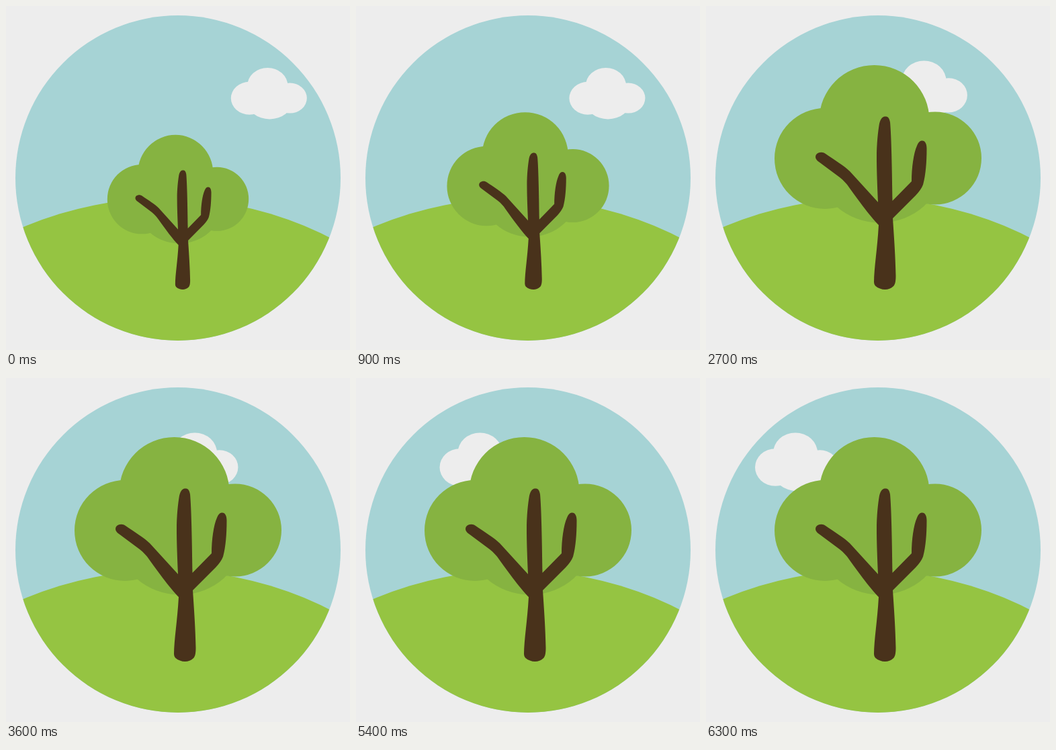
An HTML page with a canvas for the animation above (7200 ms loop, 512 px wide and 512 px high).

```html
<!DOCTYPE html>
<html lang="en">
<head>
<meta charset="utf-8">
<title>Growing tree</title>
<style>
html, body { margin: 0; width: 100%; height: 100%; overflow: hidden; background: #ededed; }
canvas { display: block; width: 100vw; height: 100vh; }
</style>
</head>
<body>
<canvas id="stage" width="512" height="512"></canvas>
<script>
const ctx = document.getElementById('stage').getContext('2d');
const STEP = 900;
const PALE = '#ededed', SKY = '#a6d3d5', GRASS = '#95c442', LEAF = '#86b341', BARK = '#49321b';

// The tree grows for three steps, then holds its full size.
const treeScales = [[0.683, 0.689], [0.783, 0.79], [0.9, 0.909], [1, 1]];
const cloudLefts = [334.8, 317.4, 296, 264.5, 221, 177, 124.5, 73];

// Lobes shared by the crown and the cloud: cx, cy, rx, ry.
const lobes = [
  [177, 227, 75, 75],
  [341, 226.5, 69, 69],
  [250.5, 170, 82, 82],
  [259, 240, 92, 82.5]
];
const BASE = { x: 256, y: 422 };
const PUFF = { left: 102, bottom: 322.5 };

const bark = new Path2D(`
  M250 411 C250 390 255 362 257 326
  C246 315 228 291 213 270 C209 264 205 260 199 255
  L168 232 C162 228 162 223 165 220 C169 217 174 217 178 220
  C190 228 207 239 214 246 L256 292
  C255 268 254 245 254 225 C254 205 256 187 258 175
  C260 167 263 164.5 267 164.5 C271 164.5 273 167 274 173
  C276 195 277 250 277.5 290
  L306 261 C306 241 309 219 314 208 C316 203 318 200.5 322 200.5
  C326 200.5 328.5 205 328.5 212 C328.5 232 327 252 323 266
  C321 271 317 277 312 282 L278 316
  C280 345 282 375 282.5 402 C282.5 411 281 415 279 417
  C272 424 260 423.5 252 416.5 Q250 414 250 411 Z`);

function disc(x, y, r, color) {
  ctx.fillStyle = color;
  ctx.beginPath();
  ctx.arc(x, y, r, 0, Math.PI * 2);
  ctx.fill();
}

function puff(color) {
  ctx.fillStyle = color;
  ctx.beginPath();
  for (const [x, y, rx, ry] of lobes) {
    ctx.moveTo(x + rx, y);
    ctx.ellipse(x, y, rx, ry, 0, 0, Math.PI * 2);
  }
  ctx.fill();
}

function drawLandscape() {
  ctx.fillStyle = PALE;
  ctx.fillRect(0, 0, 512, 512);
  disc(256, 256, 242, SKY);
  ctx.save();
  ctx.beginPath();
  ctx.arc(256, 256, 242, 0, Math.PI * 2);
  ctx.clip();
  disc(237, 826, 540, GRASS);
  ctx.restore();
}

function drawCloud(step) {
  const [sx, sy] = step < 3 ? [0.367, 0.326] : [0.404, 0.371];
  ctx.save();
  ctx.translate(cloudLefts[step], 168.4);
  ctx.scale(sx, sy);
  ctx.translate(-PUFF.left, -PUFF.bottom);
  puff(PALE);
  ctx.restore();
}

function drawTree(step) {
  const [sx, sy] = treeScales[Math.min(step, 3)];
  ctx.save();
  ctx.translate(BASE.x, BASE.y);
  ctx.scale(sx, sy);
  ctx.translate(-BASE.x, -BASE.y);
  puff(LEAF);
  ctx.fillStyle = BARK;
  ctx.fill(bark);
  ctx.restore();
}

function render(step) {
  drawLandscape();
  drawCloud(step);
  drawTree(step);
}

const start = performance.now();
function tick(now) {
  const elapsed = Math.max(0, now - start);
  render(Math.floor(elapsed / STEP) % cloudLefts.length);
  requestAnimationFrame(tick);
}
render(0);
requestAnimationFrame(tick);
</script>
</body>
</html>
```
